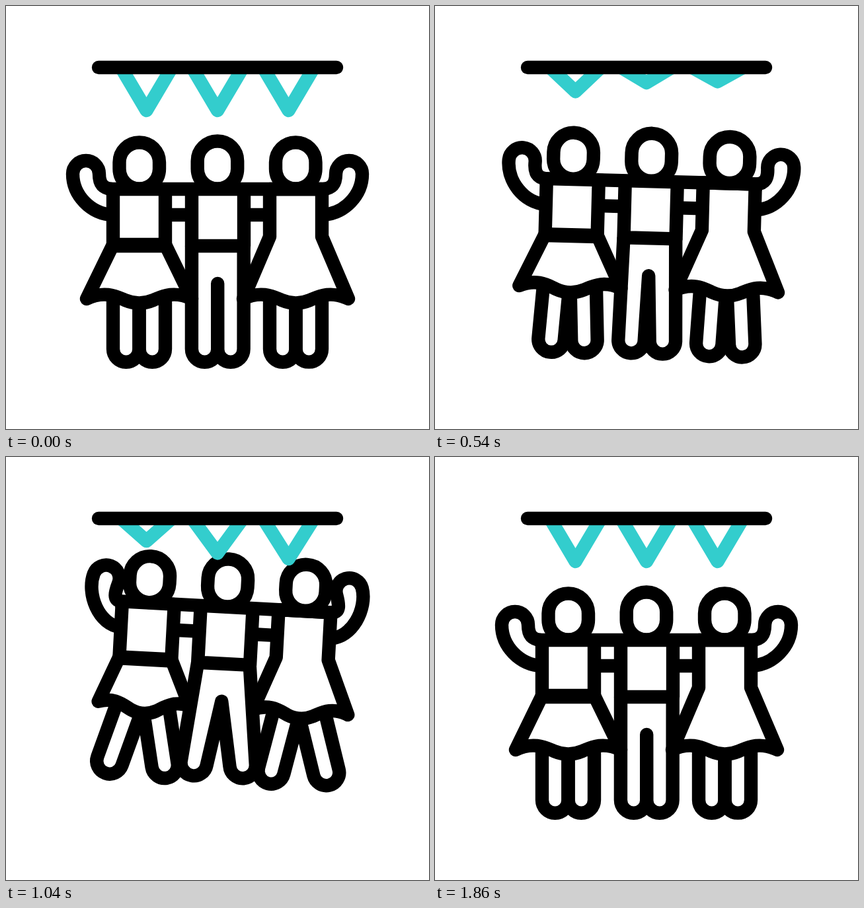
An HTML page for the animation above (2.4 s loop, 640x640 px).

```html
<!DOCTYPE html>
<html lang="en">
<head>
<meta charset="utf-8">
<title>Dancing friends</title>
<style>
  html, body { margin: 0; width: 100%; height: 100%; overflow: hidden; background: #fff; }
  svg { display: block; width: 100%; height: 100%; }
</style>
</head>
<body>
<svg viewBox="0 0 640 640" fill="none" stroke="#000" stroke-width="20.4" stroke-linejoin="round">
  <g id="group">
    <path id="armL"/>
    <path id="armR" transform="matrix(-1 0 0 1 640 0)"/>
    <path d="M241 316H281M360 316H399"/>
    <g id="legs"></g>
    <path id="trousers"/>
    <path d="M281 277V363H360V277"/>
    <path id="skirt" fill="#fff"/>
    <path d="M162 277V363H241V277"/>
    <path id="dress" fill="#fff"/>
    <path d="M152 277H488"/>
    <rect x="171.5" y="206.5" width="60.5" height="70" rx="30"/>
    <rect x="289.7" y="204.5" width="60.5" height="72" rx="30"/>
    <rect x="408" y="206.5" width="60.5" height="70" rx="30"/>
  </g>
  <g id="flags" stroke="#33cdcd"></g>
  <path d="M140 93H500" stroke-linecap="round"/>
</svg>
<script>
const LOOP = 2400;
const $ = id => document.getElementById(id);

function addPath(parent, d = "") {
  const path = document.createElementNS("http://www.w3.org/2000/svg", "path");
  path.setAttribute("d", d);
  return parent.appendChild(path);
}

// Eased interpolation through [time, value] keys.
function track(keys, t) {
  if (t <= keys[0][0]) return keys[0][1];
  for (let i = 1; i < keys.length; i++) {
    const [t0, v0] = keys[i - 1], [t1, v1] = keys[i];
    if (t < t1) return v0 + (v1 - v0) * (1 - Math.cos(Math.PI * (t - t0) / (t1 - t0))) / 2;
  }
  return keys[keys.length - 1][1];
}

const HOP = [[0, 0], [330, 1], [640, 0], [1020, 1], [1340, 0]];
const SWAY = [[0, 0], [330, -3.4], [640, 3], [1020, 3.1], [1340, 0]];
const FLAG = [[0, 158], [340, 113], [800, 154], [1200, 113], [1620, 158]];
const FLAG_DELAY = 120;

// Outer legs swing wider than the inner ones.
const legs = [[181.7, 17], [221.3, -11.8], [418.7, 11.8], [458.3, -17]].map(([x, angle]) => ({
  x, angle,
  path: addPath($("legs"), `M${x - 19.7} 424V519A19.7 19.7 0 0 0 ${x + 19.7} 519V424`)
}));

const flags = [212.5, 320, 427.5].map(x => ({ x, path: addPath($("flags")) }));

// The hand turns about the shoulder while both ends stay on the torso.
function arm(k) {
  const a = Math.PI / 10 * k, c = Math.cos(a), s = Math.sin(a);
  const turn = (x, y) => `${162 + (x - 162) * c - (y - 296) * s} ${296 + (x - 162) * s + (y - 296) * c} `;
  return `M160 277C148 276 ${turn(141, 270)}${turn(141, 254)}` +
    `A20 20 0 0 0 ${turn(101, 254)}C${turn(101, 286)}128 315 162 316`;
}

// Edges from the top corners to a wavy hem that lifts with the hop.
function gown(left, right, [leftTop, rightTop], tip, dip) {
  const mid = (left + right) / 2, scale = (right - left) / 159;
  const curl = (tip + dip) / 2;
  const p = (dx, y) => `${mid + dx * scale} ${y} `;
  return `M${leftTop}L${p(-79.5, 443 - tip)}` +
    `C${p(-51.5, 430 - curl)}${p(-33.5, 440 - dip)}${p(-21.5, 445 - dip)}` +
    `Q${p(0, 454 - dip)}${p(21.5, 445 - dip)}` +
    `C${p(33.5, 440 - dip)}${p(51.5, 430 - curl)}${p(79.5, 443 - tip)}` +
    `L${rightTop}Z`;
}

function trousers(k) {
  const spread = 17.5 * k, a = Math.atan(spread / 130);
  const c = 19.7 * Math.cos(a), s = 19.7 * Math.sin(a);
  const l = 300.6 - spread, r = 339.9 + spread, y = 519 - 4 * k;
  return `M281 363L${l - c} ${y - s}A19.7 19.7 0 0 0 ${l + c} ${y + s}` +
    `L320.2 420L${r - c} ${y + s}A19.7 19.7 0 0 0 ${r + c} ${y - s}L359.7 363`;
}

function draw(t) {
  const k = track(HOP, t);
  $("group").setAttribute("transform", `translate(0 ${-51 * k}) rotate(${track(SWAY, t)} 320 533)`);
  for (const id of ["armL", "armR"]) $(id).setAttribute("d", arm(k));
  for (const { x, angle, path } of legs)
    path.setAttribute("transform", `translate(0 ${4 * k}) rotate(${angle * k} ${x} 430)`);
  $("trousers").setAttribute("d", trousers(k));
  $("skirt").setAttribute("d",
    gown(122 + 12 * k, 281 - 9 * k, ["162 361", "241 361"], 13 * k, 5 * k));
  $("dress").setAttribute("d",
    gown(359 + 9 * k, 518 - 6 * k, ["399 277V349", "478 349V277"], 13 * k, 10 * k));
  flags.forEach(({ x, path }, i) => {
    const tip = track(FLAG, t - i * FLAG_DELAY);
    path.setAttribute("d", `M${x - 38.5} 93L${x} ${tip}L${x + 38.5} 93`);
  });
}

const start = performance.now();
function tick() {
  draw((performance.now() - start) % LOOP);
  requestAnimationFrame(tick);
}
tick();
</script>
</body>
</html>
```
